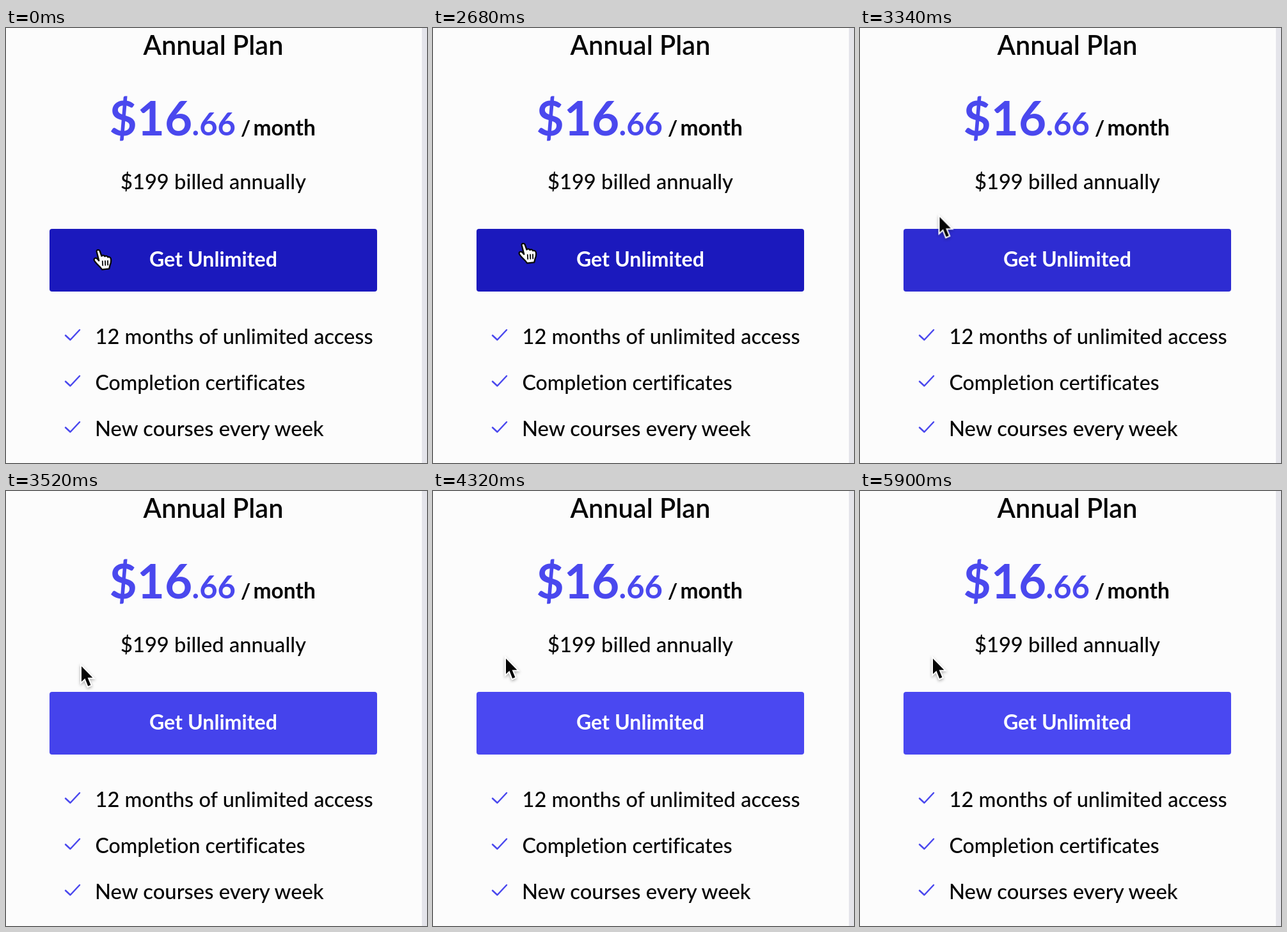
Write an HTML page that moves like this. It is 658 by 680 pixels and loops after 5920 ms.

```html
<!DOCTYPE html>
<html lang="en">
<head>
<meta charset="utf-8">
<title>Annual Plan</title>
<style>
  html, body { margin: 0; width: 100%; height: 100%; overflow: hidden; background: #fcfcfc; }
  svg { display: block; width: 658px; height: 680px; }
  text { font-family: Lato, "Open Sans", sans-serif; font-weight: 500; font-variant-ligatures: none; fill: #050505; }
  .semi { font-weight: 600; }
  .bold { font-weight: 700; }
  .accent { fill: #4a48ee; }
  .mid { text-anchor: middle; }
  .tick { fill: none; stroke: #4a48ee; stroke-width: 2.5; stroke-linecap: round; stroke-linejoin: round; }

  .button { fill: #1b19bd; animation: fade 5920ms infinite; }
  .cursor { animation: move 5920ms linear infinite; }
  .hand { animation: leave 5920ms step-end infinite; }
  .arrow { animation: enter 5920ms step-end infinite; }

  @keyframes fade {
    0%, 54.392% { fill: #1b19bd; animation-timing-function: ease; }
    62.5%, 100% { fill: #4a48f1; }
  }
  @keyframes move {
    0% { transform: translate(144px, 347px); }
    25.676% { transform: translate(144px, 347px); animation-timing-function: ease-in-out; }
    35.473%, 46.959% { transform: translate(141px, 337px); }
    52.703% { transform: translate(131.5px, 314px); }
    56.419% { transform: translate(124.5px, 295.5px); }
    59.459% { transform: translate(118px, 274px); }
    61.149% { transform: translate(118px, 274px); animation-timing-function: ease-out; }
    66.216%, 100% { transform: translate(114px, 262px); }
  }
  @keyframes leave {
    0% { visibility: visible; }
    52.703%, 100% { visibility: hidden; }
  }
  @keyframes enter {
    0% { visibility: hidden; }
    52.703%, 100% { visibility: visible; }
  }

  .hand path { fill: #fcfcfc; stroke: #080808; stroke-width: 2.3; stroke-linejoin: round; stroke-linecap: round; }
  .hand .lines { fill: none; stroke-width: 1.8; }
  .arrow path { fill: #050505; stroke: #fff; stroke-width: 4; stroke-linejoin: miter; paint-order: stroke;
    filter: drop-shadow(0 2px 2px rgba(0, 0, 0, .3)); }
</style>
</head>
<body>
<svg viewBox="0 0 658 680">
  <defs>
    <path id="tick" class="tick" d="M93 480.5L100.5 487.5L115 472"/>
  </defs>
  <rect width="658" height="680" fill="#fcfcfc"/>
  <rect x="650" width="8" height="680" fill="#e4e4ea"/>

  <text class="semi mid" x="324" y="42" font-size="41.5">Annual Plan</text>

  <text class="bold accent" x="161.5" y="168" font-size="74.5">$16</text>
  <text class="bold accent" x="290.5" y="168" font-size="49">.66</text>
  <text class="bold" x="367" y="168" font-size="33">/</text>
  <text class="bold" x="386.5" y="168" font-size="33.5">month</text>

  <text class="mid" x="324" y="252" font-size="32.7">$199 billed annually</text>

  <rect class="button" x="68" y="314" width="512" height="98" rx="4"/>
  <text class="bold mid" x="324" y="373" font-size="32.2" style="fill:#fff">Get Unlimited</text>

  <use href="#tick"/>
  <use href="#tick" y="72"/>
  <use href="#tick" y="144"/>
  <text x="139.5" y="494" font-size="32.6">12 months of unlimited access</text>
  <text x="139.5" y="566" font-size="32.1">Completion certificates</text>
  <text x="139" y="638" font-size="32.8">New courses every week</text>

  <g class="cursor">
    <g class="hand">
      <path d="M-2.4 2.2C-2.6-.6 1.8-1 2.8 2L5.5 9.5C6.5 7.8 9.6 8 10.4 10C11.6 8.8 14.6 9.2 15.2 11.2C16.8 10.4 19.4 11.2 19.8 13.6C20.8 18 20 20.6 18.6 23.4L17.2 29.4L6 30.6C4 26.4-3 22-6 16.5C-7.4 13.4-4 11.4-1.4 13.8L1.2 16.6Z"/>
      <path class="lines" d="M6.8 17.5L7.2 24M11 17.2L11.3 23.8M15 17L15.2 23.4"/>
    </g>
    <g class="arrow">
      <path d="M0 0V24L5.4 19L10.2 31L14.4 29.2L9.6 17.8H17.4Z"/>
    </g>
  </g>
</svg>
</body>
</html>
```
